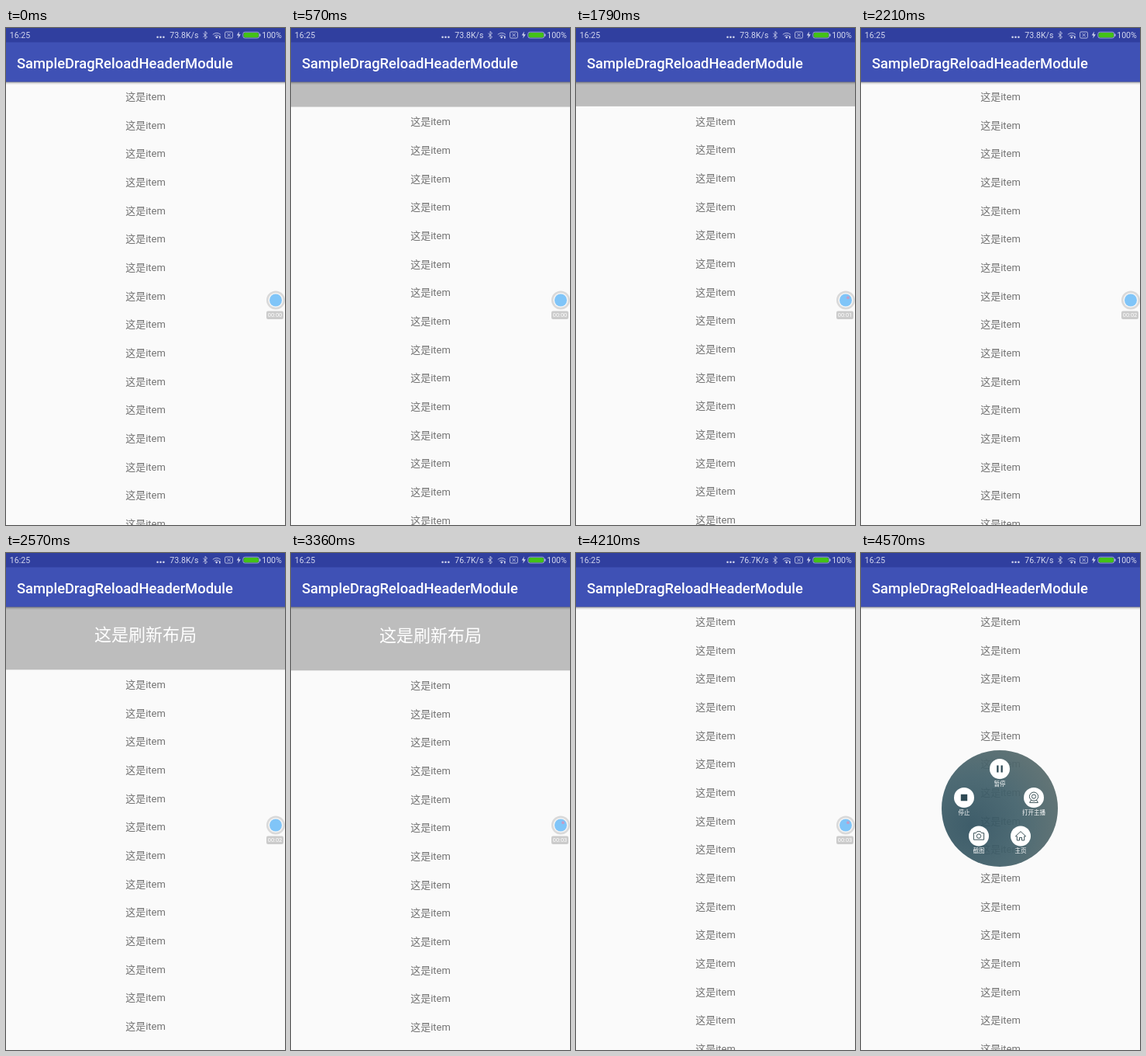
Write an HTML page that moves like this. It is 360 px wide and 640 px high and loops after 4.64 s.

```html
<!DOCTYPE html>
<html lang="zh-CN">
<head>
<meta charset="utf-8">
<title>Pull to refresh</title>
<style>
  html, body { margin: 0; width: 100%; height: 100%; overflow: hidden; background: #fafafa; }
  svg { display: block; width: 360px; height: 640px; }
  text { font-family: Roboto, "Noto Sans CJK SC", "Noto Sans CJK", sans-serif; }
  .status { font-size: 10.6px; fill: #d3d7ee; }
  .title { font-size: 18.4px; font-weight: 500; fill: #fff; }
  .item { font-size: 13px; fill: #737373; text-anchor: middle; }
  .hint { font-size: 22px; font-weight: 300; fill: #fff; text-anchor: middle; }
  .time { font-size: 7.4px; fill: #fff; text-anchor: middle; }
  .label { font-size: 7.5px; fill: #fff; text-anchor: middle; }
  .line { fill: none; stroke: #c3c8e6; stroke-width: .9; }
  .icon { fill: none; stroke: #3c5359; stroke-width: 1; stroke-linejoin: round; }
  .solid { fill: #2f4a55; }
</style>
</head>
<body>
<svg viewBox="0 0 360 640">
  <defs>
    <linearGradient id="shade" x2="0" y2="1">
      <stop offset="0" stop-color="#000" stop-opacity=".44"/>
      <stop offset=".4" stop-color="#000" stop-opacity=".18"/>
      <stop offset="1" stop-color="#000" stop-opacity="0"/>
    </linearGradient>
    <radialGradient id="disc" cx=".25" cy=".65" r=".85">
      <stop offset="0" stop-color="#30515f"/>
      <stop offset=".5" stop-color="#41606a"/>
      <stop offset="1" stop-color="#5a6c6c"/>
    </radialGradient>
  </defs>

  <rect y="60" width="360" height="580" fill="#bdbdbd"/>
  <g id="list">
    <text class="hint" x="180" y="32.3">这是刷新布局</text>
    <rect y="69.3" width="360" height="600" fill="#fafafa"/>
  </g>

  <rect y="69" width="360" height="4" fill="url(#shade)"/>
  <rect width="360" height="69.4" fill="#3f51b5"/>
  <rect width="360" height="18.4" fill="#303f9f"/>
  <text class="title" x="14" y="51.5">SampleDragReloadHeaderModule</text>

  <g class="status">
    <text x="4.8" y="13.2">16:25</text>
    <circle cx="195.6" cy="11.8" r="1.3"/>
    <circle cx="199.5" cy="11.8" r="1.3"/>
    <circle cx="203.4" cy="11.8" r="1.3"/>
    <text id="speed" x="211.3" y="13.2"></text>
    <path class="line" d="M254.4 6.8l5.2 4.8-2.6 2.4V4.4l2.6 2.4-5.2 4.8"/>
    <path class="line" d="M266.8 8.4q5-4 10 0M268.6 10.3q3.2-2.6 6.4 0"/>
    <path d="M270 11.4q1.7-1.2 3.4 0l-1.7 2.4z"/>
    <path d="M275 10.2h1.6v3.4h-1.6z"/>
    <rect class="line" x="282.6" y="5" width="9.8" height="8" rx="1.4"/>
    <path class="line" d="M285.6 7l4 4m0-4l-4 4"/>
    <path d="M300.8 4.6l-3 5h2.2l-.8 4 3.6-5.4h-2.4z"/>
    <rect class="line" x="305.8" y="5.2" width="21" height="7.8" rx="2.6" opacity=".8"/>
    <rect x="306.6" y="6" width="19.4" height="6.2" rx="1.8" fill="#43c117"/>
    <rect x="327.2" y="7.6" width="1.2" height="3"/>
    <text x="330.2" y="13.2">100%</text>
  </g>

  <g id="ball">
    <circle cx="348" cy="350.5" r="12" fill="#d9d9d9"/>
    <circle cx="348" cy="350.5" r="9.6" fill="#f4f4f4"/>
    <circle cx="348" cy="350.5" r="8" fill="#80c5f8"/>
    <circle id="blink" cx="351" cy="347.2" r="1.9" fill="#c49cc4"/>
    <rect x="336" y="364.4" width="22" height="10.6" rx="2" fill="#cbcbcb"/>
    <text id="time" class="time" x="347" y="372.4"></text>
  </g>

  <g id="menu">
    <circle cx="179" cy="329" r="75" fill="url(#disc)" opacity=".93"/>
    <g id="buttons"></g>
    <path class="solid" d="M175.2 273.4h2.3v9h-2.3zM180.5 273.4h2.3v9h-2.3zM128.8 310.8h8.4v8.4h-8.4z"/>
    <g class="icon">
      <circle cx="223" cy="313.6" r="5.6"/>
      <circle cx="223" cy="313.6" r="2.6"/>
      <path d="M219.6 318l-2 3.4h10.8l-2-3.4"/>
      <path d="M145.4 360.6h3l1.4-2h4.4l1.4 2h3v8.6h-13.2z"/>
      <circle cx="152" cy="364.6" r="2.7"/>
      <path d="M199.4 364.8l6.6-6.2 6.6 6.2h-1.9v5.2h-3.2v-3.6h-3v3.6h-3.2v-5.2z"/>
    </g>
  </g>
</svg>

<script>
  const LOOP = 4640, TICK = 1000 / 14, OPEN = 92;
  const $ = id => document.getElementById(id);

  function add(parent, tag, attrs, text = "") {
    const el = document.createElementNS("http://www.w3.org/2000/svg", tag);
    for (const k in attrs) el.setAttribute(k, attrs[k]);
    el.textContent = text;
    parent.append(el);
  }

  for (let i = 0; i < 17; i++)
    add($("list"), "text", { class: "item", x: 180, y: 93.1 + i * 36.67 }, "这是item");

  const buttons = [
    [179, 278, "暂停"], [133, 315, "停止"], [223, 315, "打开主播"],
    [152, 364.5, "截图"], [206, 364.5, "主页"]
  ];
  for (const [x, y, name] of buttons) {
    add($("buttons"), "circle", { cx: x, cy: y, r: 13, fill: "#fff" });
    add($("buttons"), "text", { class: "label", x, y: y + 21.7 }, name);
  }

  // Each drag or release: first tick, then the list offset per tick; the last one holds.
  const moves = [
    [0, [0]],
    [5, [3, 10, 20, 32.3, 50, 68, 82, 91, OPEN]],
    [22, [84, 68, 50, 31.6, 15, 5, 1.5, .6, .3, 0]],
    [33, [12, 38, 62, 81, 87, 90, 91.5, OPEN]],
    [47, [82, 64, 45, 26, 10, 2.3, .8, .4, .2, 0]]
  ];
  const MENU_TICK = 60, menuScale = [.3, .65, .95, 1.06, 1];
  const secondTicks = [16, 30, 47];

  function offsetAt(n) {
    const [start, steps] = moves.findLast(m => m[0] <= n);
    return steps[Math.min(n - start, steps.length - 1)];
  }

  const tickStart = n => Math.round(n * TICK / 10) * 10;

  function tickAt(t) {
    const n = Math.floor(t / TICK) + 1;
    return tickStart(n) <= t ? n : tickStart(n - 1) <= t ? n - 1 : n - 2;
  }

  function draw(n) {
    const secs = secondTicks.filter(s => s <= n).length;
    const open = n >= MENU_TICK;
    $("list").setAttribute("transform", `translate(0 ${offsetAt(n)})`);
    $("speed").textContent = n < 40 ? "73.8K/s" : "76.7K/s";
    $("time").textContent = "00:0" + secs;
    $("blink").style.display = secs % 2 ? "" : "none";
    $("ball").style.display = open ? "none" : "";
    $("menu").style.display = open ? "" : "none";
    if (open) {
      const s = menuScale[Math.min(n - MENU_TICK, menuScale.length - 1)];
      $("menu").setAttribute("transform", `translate(179 329) scale(${s}) translate(-179 -329)`);
    }
  }

  const begin = performance.now();
  let shown = -1;
  function run() {
    const n = tickAt((performance.now() - begin) % LOOP);
    if (n !== shown) draw(shown = n);
    requestAnimationFrame(run);
  }
  run();
</script>
</body>
</html>
```
